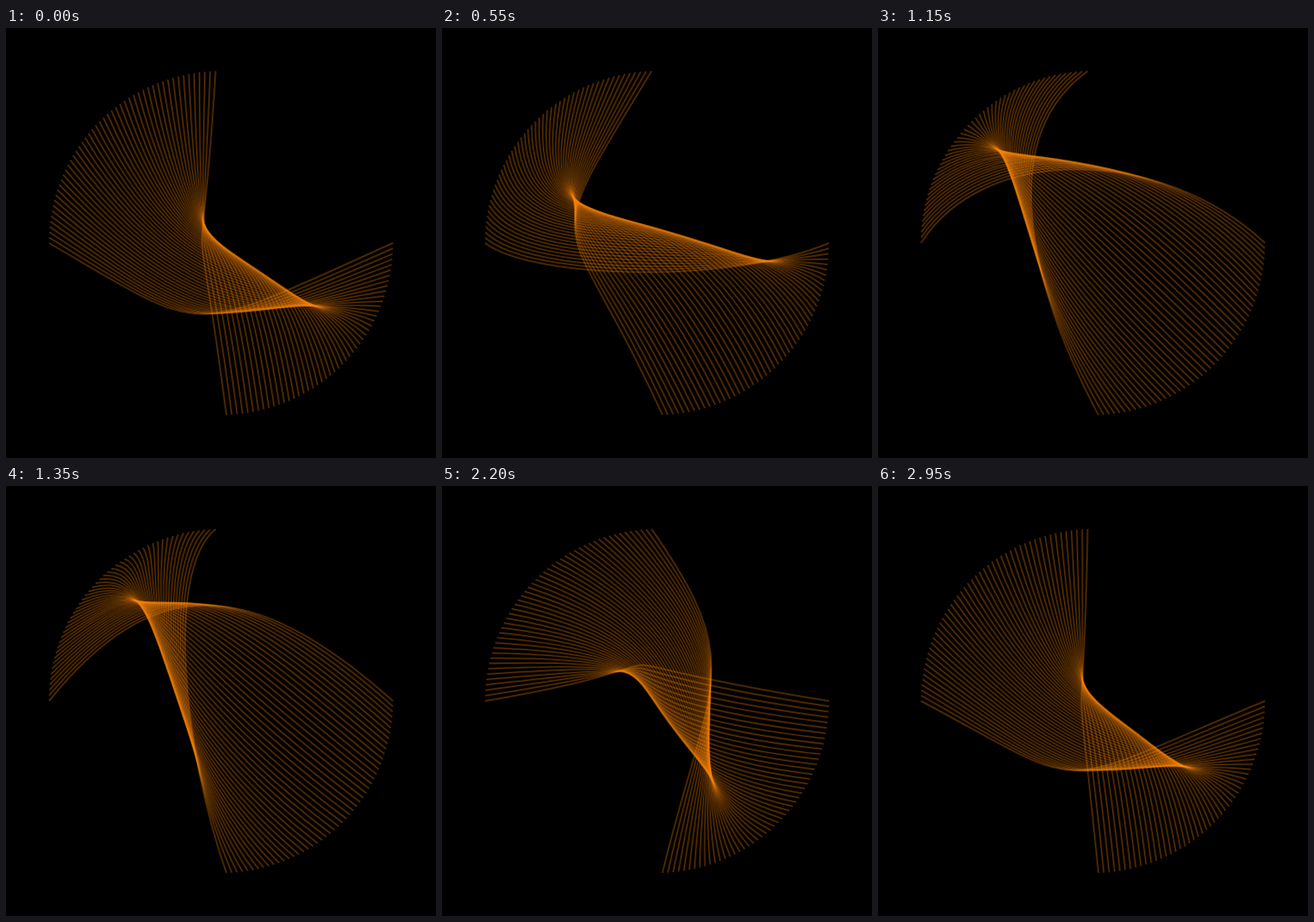
Animation of 500 by 500 pixels, one loop 3 s. Source, as an HTML page with a canvas:

```html
<!DOCTYPE html>
<html lang="en">
<head>
<meta charset="utf-8">
<title>Rotating curves</title>
<style>
html, body { margin: 0; width: 100%; height: 100%; overflow: hidden; background: #000; }
canvas { display: block; }
</style>
</head>
<body>
<canvas id="stage" width="500" height="500"></canvas>
<script>
const ctx = document.getElementById('stage').getContext('2d');
const LOOP = 3000, STEP = 50, COUNT = 50;
const RAD = Math.PI / 180;

const polar = (center, radius, degrees) => [
  center + radius * Math.cos(degrees * RAD),
  center + radius * Math.sin(degrees * RAD)
];
const mix = (a, b, k) => a + (b - a) * k;

function draw(ms) {
  const turn = Math.floor(ms % LOOP / STEP) * STEP / LOOP * 360;
  ctx.fillStyle = '#000';
  ctx.fillRect(0, 0, 500, 500);
  ctx.strokeStyle = 'rgba(255, 136, 10, 0.29)';
  ctx.lineWidth = 2;

  for (let i = 0; i < COUNT; i++) {
    const angle = i * 90 / COUNT;
    const k = i / (COUNT - 1);
    // The two handles circle in opposite directions; the second spirals inwards.
    const first = polar(225, mix(136, 132, k), mix(84, 90, k) + turn);
    const second = polar(225, mix(136, 86, Math.sin(k * 90 * RAD)), mix(98, -96, k) - turn);
    ctx.beginPath();
    ctx.moveTo(...polar(250, 200, angle + 180));
    ctx.bezierCurveTo(...first, ...second, ...polar(250, 200, angle));
    ctx.stroke();
  }
}

const start = performance.now();
function tick() {
  draw(performance.now() - start);
  requestAnimationFrame(tick);
}
tick();
</script>
</body>
</html>
```
